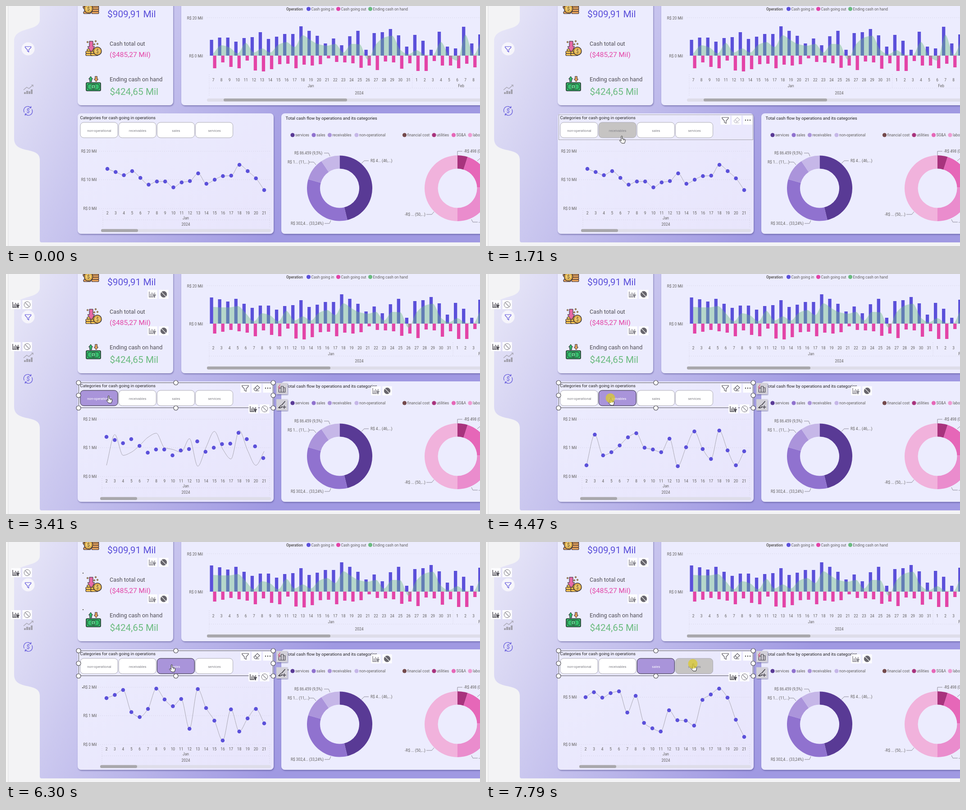
Write an HTML page that moves like this. It is 1052 by 532 pixels and loops after 7990 ms.

```html
<!DOCTYPE html>
<html lang="en">
<head>
<meta charset="utf-8">
<title>Cash flow dashboard</title>
<style>
  html, body { margin: 0; width: 100%; height: 100%; overflow: hidden; background: #f3f3f5; }
  svg { display: block; width: 1052px; height: 532px; font-family: Roboto, "Noto Sans", sans-serif; }
</style>
</head>
<body>
<svg id="stage" viewBox="0 0 1052 532">
  <defs>
    <linearGradient id="page" gradientUnits="userSpaceOnUse" x1="20" y1="80" x2="640" y2="400">
      <stop offset="0" stop-color="#e5e4f7"/>
      <stop offset=".35" stop-color="#cbc8ef"/>
      <stop offset="1" stop-color="#a099e2"/>
    </linearGradient>
    <linearGradient id="card" x1="0" y1="0" x2="1" y2="1">
      <stop offset="0" stop-color="#ececfe"/>
      <stop offset="1" stop-color="#e8e5fc"/>
    </linearGradient>
    <filter id="shadow" x="-5%" y="-5%" width="110%" height="115%">
      <feDropShadow dx="1" dy="2" stdDeviation="1.6" flood-color="#4b4689" flood-opacity=".55"/>
    </filter>
  </defs>
  <g id="base"></g><g id="bars"></g><g id="lines"></g><g id="slicer"></g><g id="tools"></g><g id="mouse"></g>
</svg>
<script>
const LOOP = 7990;
const BLUE = '#5b50da', PINK = '#e344a7', GREEN = '#6bbb80', INK = '#605e5c', DARK = '#252423';
const $ = id => document.getElementById(id);

const text = (x, y, s, size = 8.4, fill = INK, anchor = 'start', more = '') =>
  `<text x="${x}" y="${y}" font-size="${size}" fill="${fill}" text-anchor="${anchor}" ${more}>${s}</text>`;
const mid = (x, y, s, size, fill) => text(x, y, s, size, fill, 'middle');
const rect = (x, y, w, h, fill, more = '') =>
  `<rect x="${x}" y="${y}" width="${w}" height="${h}" fill="${fill}" ${more}/>`;
const dot = (x, y, r, fill, more = '') => `<circle cx="${x}" cy="${y}" r="${r}" fill="${fill}" ${more}/>`;
const path = (d, stroke, w = 1, fill = 'none', more = '') =>
  `<path d="${d}" stroke="${stroke}" stroke-width="${w}" fill="${fill}" ${more}/>`;
const dotted = d => path(d, '#c9c7d8', 1, 'none', 'stroke-dasharray="1 3.5"');
const at = (x, y, s) => `<g transform="translate(${x} ${y})">${s}</g>`;

// Monotone cubic curve through points
function curve(p) {
  const n = p.length, s = [], m = [];
  for (let i = 0; i < n - 1; i++) s.push((p[i + 1][1] - p[i][1]) / (p[i + 1][0] - p[i][0]));
  for (let i = 0; i < n; i++) {
    const a = s[i - 1] ?? s[i], b = s[i] ?? s[i - 1];
    m.push(a * b <= 0 ? 0 : 2 * a * b / (a + b));
  }
  let d = `M${p[0]}`;
  for (let i = 0; i < n - 1; i++) {
    const h = (p[i + 1][0] - p[i][0]) / 3;
    d += `C${p[i][0] + h},${p[i][1] + m[i] * h} ${p[i + 1][0] - h},${p[i + 1][1] - m[i + 1] * h} ${p[i + 1]}`;
  }
  return d;
}

// Daily values from Jan 2, as heights on the stage
const cashIn = [52, 56, 61, 55, 66, 75, 70, 70, 79, 71, 69, 58, 73, 68, 62, 62, 45, 55, 66, 83, 72, 87, 67, 55, 97,
  60, 58, 51, 65, 90, 64, 77, 97, 57, 90, 94, 46, 83, 63];
const cashOut = [132, 128, 124, 127, 130, 138, 125, 135, 138, 121, 143, 145, 140, 129, 128, 138, 130, 132, 129, 116,
  124, 125, 127, 137, 132, 142, 123, 125, 139, 127, 144, 144, 122, 132, 132, 138, 128, 136, 130];
const onHand = [73, 74, 74, 71, 87, 105, 87, 92, 105, 82, 103, 94, 103, 86, 80, 91, 65, 76, 85, 88, 84, 103, 84, 85,
  119, 85, 70, 66, 97, 107, 98, 108, 109, 80, 111, 121, 64, 108, 75];

// Line chart: start of the axis, labels [text, y], point heights
const charts = [
  { x0: 225, axis: [['R$ 20 Mil', 322], ['R$ 10 Mil', 385], ['R$ 0 Mil', 449]],
    y: [361, 368, 375, 366, 381, 396, 389, 389, 402, 391, 388, 371, 394, 385, 377, 376, 352, 366, 382, 408] },
  { x0: 223, axis: [['R$ 2 Mil', 322], ['R$ 1 Mil', 385], ['R$ 0 Mil', 449]],
    y: [424, 356, 402, 395, 380, 362, 353, 385, 389, 395, 365, 426, 384, 349, 388, 410, 347, 391, 424, 393] },
  { x0: 223, axis: [['R$ 2 Mil', 322], ['R$ 1 Mil', 385], ['R$ 0 Mil', 449]],
    y: [346, 339, 328, 377, 388, 370, 325, 349, 364, 348, 414, 326, 368, 396, 440, 371, 420, 391, 370, 402] },
  { x0: 221, axis: [['R$ 5 Mil', 344], ['R$ 0 Mil', 449]],
    y: [344, 333, 345, 335, 331, 378, 341, 401, 413, 420, 373, 395, 396, 407, 350, 338, 325, 345, 394, 432] }
];
const gap = c => (573 - c.x0) / 19;

function ring(cx, cy, R, r, parts) {
  let a = 0, out = '';
  for (const [deg, fill] of parts) {
    const b = a + deg, big = deg > 180 ? 1 : 0;
    const p = (q, w) => `${cx + q * Math.sin(w * Math.PI / 180)},${cy - q * Math.cos(w * Math.PI / 180)}`;
    out += `<path fill="${fill}" d="M${p(R, a)}A${R},${R} 0 ${big} 1 ${p(R, b)}L${p(r, b)}A${r},${r} 0 ${big} 0 ${p(r, a)}Z"/>`;
    a = b;
  }
  return out;
}

const legend = (y, items) => items.map(([x, s, c]) => dot(x, y, 4.6, c) + text(x + 6, y + 3, s)).join('');
const coin = (x, y, r) => dot(x, y, r, '#f6c453', 'stroke="#2b2430" stroke-width="1.4"') +
  dot(x, y, r - 3, '#f9d577', 'stroke="#8a5a20" stroke-width=".7"') +
  mid(x, y + r * .42, '$', r * 1.2, '#4a3418');
const stack = (x, y, n, fill) => Array.from({ length: n }, (_, i) =>
  rect(x, y - i * 5, 16, 5, fill, 'rx="2" stroke="#2b2430" stroke-width="1.1"')).join('');
const arrow = (x, y, w, h, fill) => path(
  `M${x - w / 4},${y}V${y + h * .5}H${x - w / 2}L${x},${y + h}L${x + w / 2},${y + h * .5}H${x + w / 4}V${y}Z`,
  '#2b2430', 1, fill, 'stroke-linejoin="round"');

function drawBase() {
  const panel = (x, y, w, h, fill = '#ececfe') => rect(x, y, w, h, fill, 'rx="8" filter="url(#shadow)"');
  const lead = d => path(d, '#8d8b98', 1);
  return rect(0, 0, 1052, 532, '#f3f3f5') + rect(0, 0, 4, 532, '#f7f7f7') + rect(4, 0, 1.5, 532, '#e6e6e8') +
    `<path fill="url(#page)" d="M75,0V30C75,58 18,44 18,78V294C18,330 75,310 75,340V520Q75,524 79,524H1052V0Z"/>` +
    panel(159, -20, 212, 240) + panel(389, -20, 690, 240) + panel(159, 238, 435, 267, 'url(#card)') +
    panel(611, 238, 470, 267) +
    // side menu
    dot(49, 95, 14.5, '#f6f5fb') + path('M42.5,90H55.5V92L50.5,97V102L47.5,100V97L42.5,92Z', BLUE, 1.2) +
    [[40, 4], [45, 7], [50, 6], [55, 10]].map(([x, h]) => rect(x, 195 - h, 4, h, '#a3a1ad')).join('') +
    path('M39,186L46,180L51,183L60,175M56,175H60V179', '#a3a1ad', 1.2) +
    path('M40.5,236A9,9 0 0 1 55,225.500M57.500,229A9,9 0 0 1 43,239.500M55.500,222V226H51.500M42.500,243V239H46.500', BLUE, 1.2) +
    mid(49, 237, '$', 12, BLUE) +
    // totals
    stack(171, 0, 3, '#e9a45b') + stack(190, 12, 4, '#e9a45b') + stack(172, 12, 1, '#e9a45b') + coin(183, 6, 9.5) +
    text(225, 24.5, '$909,91 Mil', 20.8, BLUE) +
    stack(177, 105, 2, '#f6c453') + stack(180, 95, 1, '#f6c453') + stack(188, 105, 3, '#f6c453') + coin(203, 100, 9) +
    arrow(189, 78, 16, 24, '#e66aa6') +
    [[181, 80], [199, 78], [203, 84], [196, 85]].map(([x, y]) => dot(x, y, 1.6, '#f6c453', 'stroke="#2b2430" stroke-width=".8"')).join('') +
    text(230, 87.5, 'Cash total out', 12.7, '#4f4d55') + text(230, 112.5, '($485,27 Mil)', 15.5, PINK) +
    rect(178, 170, 32, 18, '#35bd6c', 'rx="2" stroke="#1d2a24" stroke-width="1.6"') +
    rect(181, 173, 26, 12, 'none', 'rx="4" stroke="#1d2a24" stroke-width="1"') +
    dot(194, 179, 5, '#5fd98f', 'stroke="#1d2a24"') + mid(194, 182, '$', 8, '#1d2a24') +
    `<g transform="rotate(180 188 162)">${arrow(188, 156, 9, 12, '#35bd6c')}</g>` + arrow(200, 156, 9, 12, '#e9a45b') +
    text(230, 167, 'Ending cash on hand', 12.7, '#4f4d55') + text(230.500, 197, '$424,65 Mil', 20.8, GREEN) +
    // column chart frame
    text(622, 9.500, 'Operation', 8.4, INK, 'start', 'font-weight="700"') +
    legend(6.500, [[671.500, 'Cash going in', BLUE], [737.500, 'Cash going out', PINK], [808.500, 'Ending cash on hand', GREEN]]) +
    text(437, 29.500, 'R$ 20 Mil', 8.500, INK, 'end') + text(437, 114, 'R$ 0 Mil', 8.500, INK, 'end') +
    dotted('M446,26H1052M446,110H1052M451,182H1052M451,152V200') + mid(784, 195.500, '2024') +
    // donuts
    text(620.500, 252, 'Total cash flow by operations and its categories', 9.6, DARK) +
    legend(286, [[636, 'services', '#593a95'], [683, 'sales', '#9072cf'], [718.500, 'receivables', '#ab94db'],
      [778, 'non-operational', '#c6b7e8'], [884.500, 'financial cost', '#744a4c'], [950, 'utilities', '#a8337d'],
      [993.500, 'SG&amp;A', '#e667b8'], [1030, 'labor', '#ef9ad3']]) +
    ring(740.500, 404, 72.500, 43.500, [[166.300, '#593a95'], [119.700, '#9072cf'], [40, '#ab94db'], [34, '#c6b7e8']]) +
    ring(1002, 404, 73, 43.500, [[18, '#a8337d'], [70, '#e667b8'], [92, '#ea8ccd'], [180, '#f1b2dc']]) +
    text(640, 329, 'R$ 86.459 (9,5%)', 8.300) + text(625, 349, 'R$ 1... (11,...)', 8.300) +
    text(809, 346, 'R$ 4... (46,...)', 8.300) + text(632, 485, 'R$ 302,4... (33,24%)', 8.300) +
    text(1016, 325, '-R$ 498 (0,...)', 8.300) + text(885, 465, '-R$ ... (50,...)', 8.300) + text(1049, 482, '-R$', 8.300) +
    lead('M706,326H716L719,333M672,346H683L688,352M805,343H795L789,349M707,482H718L721,475') +
    lead('M1013,322H1002V331M1052,338L1046,343M933,462H945L950,456M1033,473L1036,479H1047') +
    text(164.500, 251, 'Categories for cash going in operations', 9.6, DARK);
}

function drawBars(first) {
  const step = 18.05, X = i => 460 + (i - first) * step;
  const split = X(30) - 9.5, thumb = first ? 483 : 446;
  let out = dotted(`M${split},152V182`), pts = [];
  for (let i = first; i < cashIn.length && X(i) < 1075; i++) {
    const x = X(i);
    out += rect(x - 7.5, cashIn[i], 7.3, 110 - cashIn[i], BLUE) + rect(x - .5, 110, 7.3, cashOut[i] - 110, PINK) +
      mid(x, 166.500, i < 30 ? i + 2 : i - 29, 8.4);
    pts.push([x, onHand[i]]);
  }
  const last = pts[pts.length - 1][0];
  return out + `<path fill="${GREEN}" opacity=".42" d="${curve(pts)}L${last},110L460,110Z"/>` +
    mid((451 + split) / 2, 180, 'Jan') + mid(first ? 1010 : 1055, 180, 'Feb') +
    rect(446, 205, 620, 7, '#dedde9', 'rx="3.5"') + rect(thumb, 205, 274, 6.5, '#a9a8ac', 'rx="3"');
}

function drawLines(now, marks, hot) {
  const c = charts[now], old = charts[marks], g = gap(c), start = c.x0 - 14;
  let out = c.axis.map(([s, y]) => text(201.500, y + 3.300, s, 8.4, INK, 'end') + dotted(`M${start - 4},${y}H588`)).join('');
  out += dotted(`M${start + 4},474H585M${start + 4},453V490M585,453V490`) + mid(399, 473, 'Jan') + mid(399, 486.500, '2024') +
    rect(start, 494.500, 588 - start, 6.5, '#dedde9', 'rx="3"') + rect(start, 494.500, 82, 6.5, '#a9a8ac', 'rx="3"') +
    path(curve(c.y.map((y, i) => [c.x0 + i * g, y])), '#a9a7b3', 1);
  c.y.forEach((_, i) => out += mid(c.x0 + i * g, 462, i + 2, 8.4));
  if (hot >= 0) out += path(`M${c.x0 + hot * g},322V449`, '#45434c', 1.2);
  old.y.forEach((y, i) => {
    const x = c.x0 + i * gap(old);
    out += dot(x, y, 4.3, BLUE) + (i === hot ? dot(x, y, 2.6, '#a7a3dd') : '');
  });
  return out;
}

function drawButtons(chosen, hover) {
  return ['non-operational', 'receivables', 'sales', 'services'].map((s, i) => {
    const x = 165 + i * 85.2, on = i === chosen, over = i === hover && !on;
    return rect(x, 258, 83, 34, on ? '#a994da' : over ? '#c6c4c3' : '#fff',
      `rx="7.5" stroke="${on ? '#2a2733' : '#aaa9b2'}"`) +
      mid(x + 42, 278.700, s, 7.7, on ? '#fff' : '#808087');
  }).join('');
}

const tile = (x, y, s, w = 21) => at(x, y, rect(-w / 2, -10, w, 20, '#fdfdff') + s);
const funnel = path('M-7,-6H7V-4L2,1.500V7L-2,5V1.500L-7,-4Z', '#55535b', 1.2);
const more = [-5, 0, 5].map(x => dot(x, 0, 1.2, '#444')).join('');
const eraser = c => path('M-6,2L2,-6L7,-1L-1,6H-3ZM-3,-1L2,4M-1,6H6', c, 1.1);
const down = c => path('M0,-7V7M-5.500,2L0,7L5.500,2', c, 1.3);

function chartTools() {
  const pale = '#c5c3cc';
  return rect(161.500, 310, 431, 194, 'none', 'stroke="#a3a1a9"') +
    tile(425, 299, `<g transform="rotate(180)">${down('#55535b')}</g>`) + tile(450, 299, down('#55535b')) +
    tile(475, 299, path('M-4,-7V7M-7,4L-4,7L-1,4M4,-7V7M1,4L4,7L7,4', pale)) +
    tile(499, 299, path('M0,-7V-1M-5,6V-1H5V6M-7,4L-5,6L-3,4M3,4L5,6L7,4', pale)) +
    tile(531, 299, funnel) +
    tile(556, 299, path('M0,-5H-6V6H6V1M-2,2L6,-5M2,-5H6V-1', '#55535b', 1.1)) + tile(581, 299, more);
}

function slicerTools(edit) {
  return rect(161.500, 241, 431, 55.500, 'none', `stroke="${edit ? '#55535b' : '#a3a1a9'}"`) +
    tile(531, 253, funnel) + tile(556, 253, eraser(edit ? '#55535b' : '#bdbbc4')) + tile(581, 253, more);
}

function editTools() {
  const pair = (x, y, full) => {
    const c = full ? '#85838c' : '#4a4850';
    return tile(x, y, path('M-7,-6V6H2M-4,5V-1M-1,5V-4M2,5V-2M5,1V-4', c, 1.4) + path('M1,1H8L5.500,4V7H3.500V4Z', c, .8, c)) +
      tile(x + 25, y, dot(0, 0, 6.8, full ? '#66646b' : 'none', 'stroke="#77757d"') +
        path('M-4.800,-4.800L4.800,4.800', full ? '#fff' : '#77757d', 1.2));
  };
  const side = (y, s) => at(612.500, y, rect(-12.500, -12.500, 25, 25, '#d2d0d8', 'filter="url(#shadow)"') + s);
  const knob = (x, y) => dot(x, y, 5, '#fff', 'stroke="#55535b" stroke-width="1.2"');
  return pair(22, 68) + pair(22, 161) + pair(325, 45, 1) + pair(325, 126, 1) + pair(549, 299) + pair(821, 259, 1) +
    side(254, path('M-7,8V-1H-2V8M-2,8V-5H3V8M3,8V-2H7V8H-7', '#3c3a42', 1.2) + path('M-4,-9L-8,-3H-5L-7,2', '#d04a72', 1.2)) +
    side(290, path('M7,-8L-1,1M-2,1C-4,1 -4,6 -8,6C-4,8 0,6 0,3', '#3c3a42', 1.6) + path('M5,1V9M1,5H9', '#3c3a42', 1.3)) +
    [161, 377, 593].map(x => knob(x, 241) + knob(x, 297)).join('') + knob(161, 269) + knob(593, 269);
}

// Pointer: time, x, y
const route = [[810, 1046, 520], [1300, 374, 331], [1570, 328, 294], [2060, 236, 274], [2390, 228, 270],
  [3820, 228, 270], [4330, 277, 275], [5220, 277, 275], [5770, 368, 272], [7110, 368, 272], [7700, 460, 270]];
function pointer(t) {
  if (t < route[0][0]) return null;
  const i = route.findIndex(k => k[0] > t);
  if (i < 0) return route[route.length - 1].slice(1);
  const [t0, x0, y0] = route[i - 1], [t1, x1, y1] = route[i];
  const u = (t - t0) / (t1 - t0), e = i === 1 ? 1 - (1 - u) ** 2 : i < 4 ? u : u * u * (3 - 2 * u);
  return [x0 + (x1 - x0) * e, y0 + (y1 - y0) * e];
}
const hand = path('M-1.500,1C-1.500,-.5 1,-.5 1,1V6L7,7.500Q8,8 7.500,11L6,16H0L-5,10.500C-5.500,9 -4,8.500 -3,9.500L-1.500,11Z',
  '#222', 1, '#fff', 'stroke-linejoin="round"') + path('M3,7V10M5.200,7.500V10', '#222', .7);
const arrowTip = path('M0,0V12L2.800,9.500L4.800,14L6.800,13L4.800,8.800H8.500Z', '#222', 1, '#fff');

const within = (t, spans) => spans.some(([a, b]) => t >= a && t < b);
const stage = (t, times) => times.filter(s => t >= s).length;
const shown = {};
function put(id, html) {
  if (shown[id] !== html) $(id).innerHTML = shown[id] = html;
}

function render(t) {
  const p = pointer(t), edit = t >= 3040;
  const slot = p && p[1] >= 262 && p[1] <= 292 ? (p[0] - 165) / 85.2 : -1;
  const hover = slot >= 0 && slot % 1 < .97 ? Math.floor(slot) : -1;
  const onChart = p && t < 1570 && p[0] < 592;
  const hot = onChart ? Math.min(19, Math.round((pointer(t - 80)[0] - 225) / 18.42)) : -1;

  put('bars', drawBars(t < 3280 ? 5 : 0));
  put('lines', drawLines(stage(t, [3280, 4810, 6580]), stage(t, [3470, 5220, 6840]), hot));
  put('slicer', drawButtons(stage(t, [3040, 4470, 6170]) - 1, hover));

  let tools = onChart ? chartTools() : t >= 1570 ? slicerTools(edit) : '';
  if (edit) tools += editTools();
  if (within(t, [[3060, 3280], [4500, 4740], [6170, 6500]]))
    tools += [[171, 69], [171, 150], [626, 283.500], [170, 323]].map(([x, y]) => dot(x, y, 1.1, '#333')).join('');
  put('tools', tools);

  let mouse = '';
  if (p) {
    mouse = at(p[0], p[1], hover >= 0 ? hand : arrowTip);
    if (within(t, [[2920, 3100], [4360, 4500], [5970, 6170], [7790, LOOP]]))
      mouse += dot(p[0] - 1, p[1], 10.5, '#dccb2e', 'opacity=".75"');
  }
  put('mouse', mouse);
}

put('base', drawBase());
const begin = performance.now();
function tick() {
  render((performance.now() - begin) % LOOP);
  requestAnimationFrame(tick);
}
tick();
</script>
</body>
</html>
```
